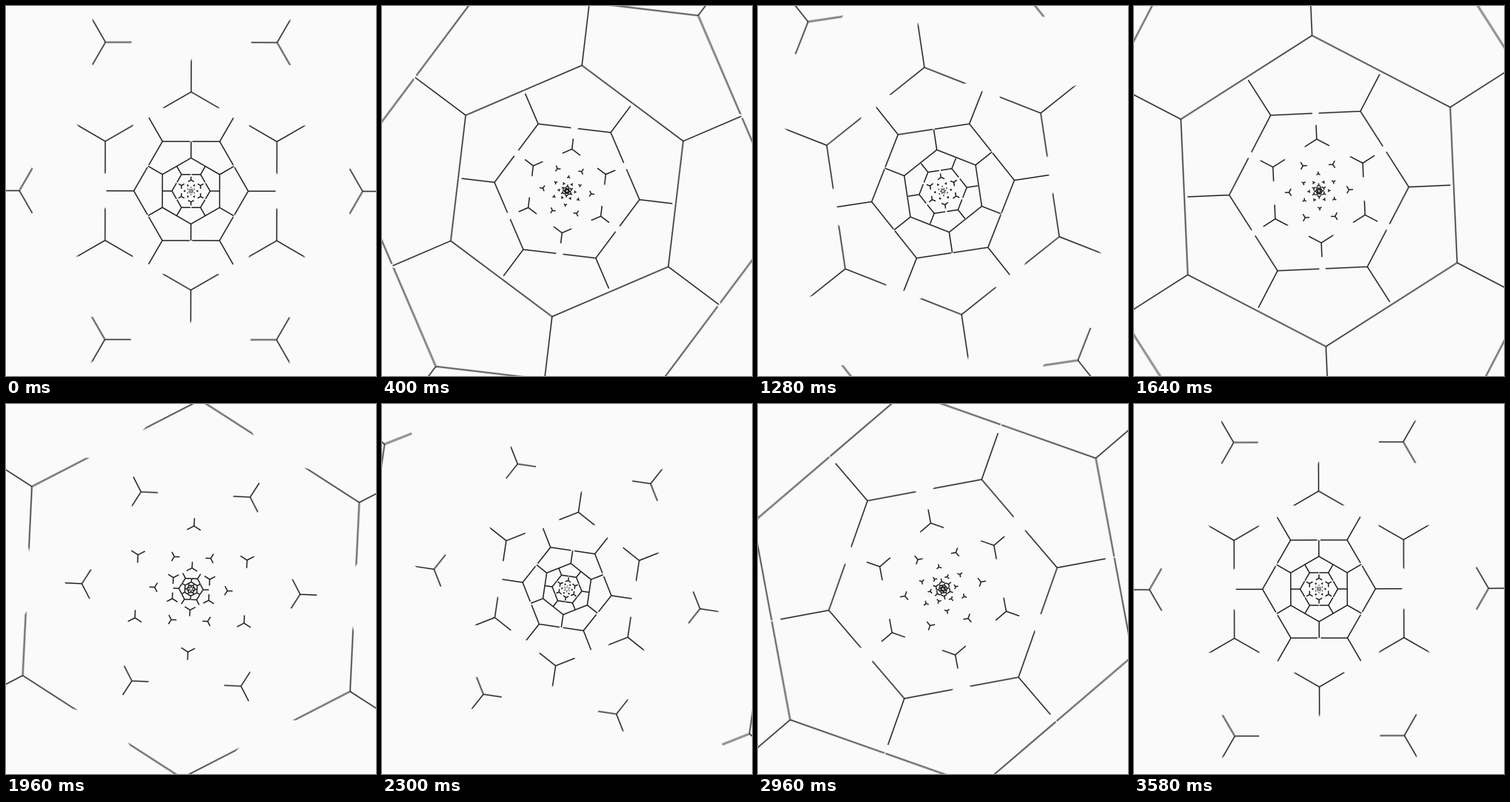
An HTML page with a canvas for the animation above (3600 ms loop, 500 by 500 pixels).

```html
<!DOCTYPE html>
<html lang="en">
<head>
<meta charset="utf-8">
<title>Tripod rings</title>
<style>
  html, body { margin: 0; width: 100%; height: 100%; overflow: hidden; background: #fafafa; }
  canvas { display: block; }
</style>
</head>
<body>
<canvas id="stage" width="500" height="500"></canvas>
<script>
const LOOP = 3600;
const FRAME = 20 / LOOP;
const SHUTTER = 0.6;   // share of a frame covered by motion blur
const SAMPLES = 5;
const BASE = 400 / 9;  // radius of ring 0 at time 0
const SIXTH = Math.PI / 3;
const THIRD = SIXTH * 2;

const ctx = document.getElementById('stage').getContext('2d');

const easeCubic = x => x < 0.5 ? 4 * x ** 3 : 1 - 4 * (1 - x) ** 3;

// Arm length relative to the ring radius: a wave running outward.
function armRatio(pos, t) {
  const phase = (((pos - 24 * t) % 8) + 8) % 8;
  const dist = Math.min(phase, 8 - phase) / 4;
  return 0.5 - 0.375 * easeCubic(dist);
}

function addRing(n, t) {
  const pos = n + 4 * t;
  const radius = BASE * 3 ** (pos / 2);
  if (radius < 1.5 || radius > 800) return;
  const arm = radius * armRatio(pos, t);
  const turn = t * SIXTH + (n % 2 ? 0 : SIXTH / 2);
  for (let i = 0; i < 6; i++) {
    const a = turn + i * SIXTH;
    const x = radius * Math.cos(a);
    const y = radius * Math.sin(a);
    for (let j = 0; j < 3; j++) {
      const b = a + j * THIRD;
      ctx.moveTo(x, y);
      ctx.lineTo(x + arm * Math.cos(b), y + arm * Math.sin(b));
    }
  }
}

function fill(color, mode) {
  ctx.globalCompositeOperation = mode;
  ctx.fillStyle = color;
  ctx.fillRect(0, 0, 500, 500);
}

// Samples add up as light on black, then the picture is inverted.
function draw(t) {
  ctx.setTransform(1, 0, 0, 1, 0, 0);
  fill('#000', 'source-over');
  ctx.globalCompositeOperation = 'lighter';
  ctx.strokeStyle = 'rgb(44, 44, 44)';
  ctx.lineWidth = 1.5;
  ctx.translate(250, 250);
  for (let s = 0; s < SAMPLES; s++) {
    const time = t + FRAME * SHUTTER * s / (SAMPLES - 1);
    ctx.beginPath();
    for (let n = -11; n <= 6; n++) addRing(n, time);
    ctx.stroke();
  }
  ctx.setTransform(1, 0, 0, 1, 0, 0);
  fill('#fafafa', 'difference');
}

function tick(now) {
  draw((now % LOOP) / LOOP);
  requestAnimationFrame(tick);
}
draw(0);
requestAnimationFrame(tick);
</script>
</body>
</html>
```
